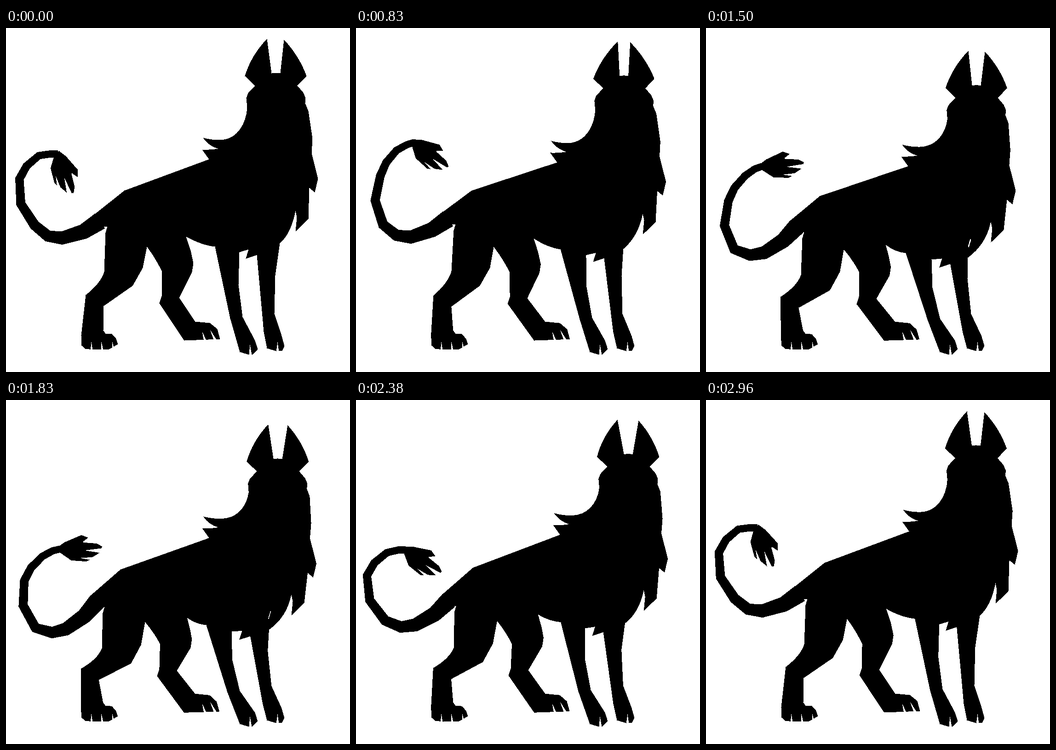
These frames come from a looping animation (748 by 748 pixels, 3 s). An HTML page:

```html
<!DOCTYPE html>
<html lang="en">
<head>
<meta charset="utf-8">
<title>Creature idle loop</title>
<style>
html, body { margin: 0; height: 100%; overflow: hidden; background: #fff; }
svg { display: block; width: 100vw; height: 100vh; }
</style>
</head>
<body>
<svg viewBox="-.5 -.5 748 748" shape-rendering="crispEdges">
<path id="body"/><path id="tail"/><path id="tuft"/>
<path id="toes" fill="#fff"/><path id="slit" stroke="#fff" d="M575 459L570 476"/>
</svg>
<script>
const LOOP = 3000, STEP = LOOP / 72;

// Resting outline, clockwise from the nape
const head = `M441 285L426 264Q443 265 461 262Q440 256 428 238Q445 243 464 243
C500 243 522 210 524 172L522 152L526 141L541 125L519 104Q532 60 567 23L577 98L586 97
L596 98L604 25Q637 60 653 104L633 125L646 140L651 152L650 163L657 180L666 240`;
const front = `L664 272L678 327L671 357L659 347L657 415L629 442L632 411L629 397
Q620 445 595 468L585 538L583 620L599 669L605 691L600 701L587 702L567 696L560 660L545 493
L521 501L527 481L507 487L505 558L514 628L541 679L547 698L536 709L528 710L508 704L487 631
L454 475Q425 472 391 453`;
const rear = `L401 483L407 511L404 530L376 586L411 638L443 641L459 654L465 676L387 679
L333 598L338 583L339 530Q326 502 306 475L297 521L275 560L212 604L211 657L216 664L230 665
L239 675L243 687L236 691L224 698L189 699L172 697L164 690L163 668L173 580Q205 555 213 530
L216 445L220 431L176 432L189 407L257 353Z`;
const outline = head + front + rear;

// Joint: rest x, y, then cosine and sine swing of x and of y
const joints = {
  head: [586, 130, 0.5, -5, 13.3, -10],
  leftEar: [567, 23, 1.5, 0, 13, -10],
  rightEar: [604, 25, 1, -9.5, 13, -10],
  mane: [430, 260, -1, -3, 7.5, -2],
  ruff: [670, 327, -2.5, -1.5, 13, -8.5],
  beard: [632, 430, -5, 0, 12, -7.5],
  shoulder: [592, 470, -13, 1, 15.5, -6],
  brisket: [526, 490, -7, 2.5, 10, -4.5],
  belly: [507, 487, -8.5, 3, 8, -3],
  elbow: [454, 475, -10, 2, 7, -2.5],
  rightKnee: [575, 545, -8.5, 2, 3, -2.5],
  leftKnee: [500, 558, -6.5, 3, 3, -2],
  rightWrist: [580, 620, -3.5, 0, 0.7, 0],
  leftWrist: [500, 630, -2.7, 2, 2, -1],
  flank: [391, 453, -0.3, -4.7, 9, -6.5],
  stifle: [405, 522, -2.7, -2.5, 4, -2.5],
  thigh: [337, 530, -3.3, -2, 0, 0],
  farHock: [345, 592, -3, -0.3, 1, 0],
  groin: [306, 475, -3.4, -3, 3, -3],
  knee: [285, 543, -3, -2.7, 5, -6],
  nearHock: [188, 590, -5.7, 1.5, 2, -0.8],
  rump: [205, 425, -3.5, 0, 6, -12],
  haunch: [214, 530, -3.5, -2, 3.3, -5],
  hip: [257, 353, -5, -0.5, 6, -7],
};
const feet = [[200, 685], [425, 665], [525, 692], [585, 690]];
const rig = [...Object.values(joints), ...feet.map(p => [...p, 0, 0, 0, 0])];

// Tail link: length, mean angle, cosine and sine swing of the angle
const links = [
  [43, 140.5, 6.5, 6.5], [49, 155.5, 8, 7], [31, 179.5, 9, 10], [37, 210, 9.5, 10.5],
  [55.5, 242.5, -5.3, 8.5], [54, 273, -6.1, 8], [32, 297, 2, -3], [35, 315.5, 4, -4.5],
  [25, 338.5, 13.5, -5], [17, 350, 10, -6],
];
const tuft = `M-6 -4L0 8L25 24L58 25L65 21L44 18L71 15L86 5L53 1L90 -5L91 -9
L79 -15L50 -16L49 -18L60 -27L45 -32L9 -15L0 -8Z`;

// White wedge between toes: tip x, y and lean
const toeGaps = [[185, 682, -2], [207, 682, -1], [230, 679, 0], [426, 659, 4],
  [443, 655, 8], [530, 688, -2], [590, 682, -3]];

const el = id => document.getElementById(id);
const draw = (id, d) => el(id).setAttribute('d', d);
const mapPoints = (path, f) => path.replace(/(-?\d+) (-?\d+)/g,
  (_, x, y) => f(+x, +y).map(n => n.toFixed(2)).join(' '));

draw('toes', toeGaps.map(([x, y, lean]) => `M${x} ${y}l${lean} 22h6z`).join(''));

// Each point follows the joints, the near ones most
function bend(x, y, cos, sin) {
  let dx = 0, dy = 0, total = 0;
  for (const [jx, jy, ax, bx, ay, by] of rig) {
    const w = 1 / ((x - jx) ** 2 + (y - jy) ** 2 + 1) ** 2;
    dx += w * (ax * (1 - cos) + bx * sin);
    dy += w * (ay * (1 - cos) + by * sin);
    total += w;
  }
  return [x + dx / total, y + dy / total];
}

function drawTail([x, y], cos, sin) {
  const angles = links.map(([, mean, a, b]) => (mean + a * cos + b * sin) * Math.PI / 180);
  const inner = [], outer = [];
  for (let i = 0; i <= links.length; i++) {
    const before = angles[Math.max(0, i - 1)], after = angles[i] ?? before;
    const normal = (before + after) / 2 + Math.PI / 2;
    const half = (13 + 26 * 0.78 ** i) / 2;
    const nx = half * Math.cos(normal), ny = half * Math.sin(normal);
    inner.push([x + nx, y + ny]);
    outer.unshift([x - nx, y - ny]);
    if (i < links.length) {
      x += links[i][0] * Math.cos(after);
      y += links[i][0] * Math.sin(after);
    }
  }
  draw('tail', 'M' + [...inner, ...outer].join('L') + 'Z');

  const turn = (37 + 37 * cos + 10 * sin) * Math.PI / 180;
  const c = Math.cos(turn), s = Math.sin(turn);
  draw('tuft', mapPoints(tuft, (a, b) => [x + a * c - b * s, y + a * s + b * c]));
}

function frame() {
  const step = Math.floor(performance.now() % LOOP / STEP + 0.15);
  const phase = step * STEP / LOOP * 2 * Math.PI;
  const cos = Math.cos(phase), sin = Math.sin(phase);
  draw('body', mapPoints(outline, (x, y) => bend(x, y, cos, sin)));
  drawTail(bend(204, 419, cos, sin), cos, sin);
  el('slit').setAttribute('stroke-width', Math.max(0, -cos - 0.4) * 4);
  requestAnimationFrame(frame);
}
frame();
</script>
</body>
</html>
```
